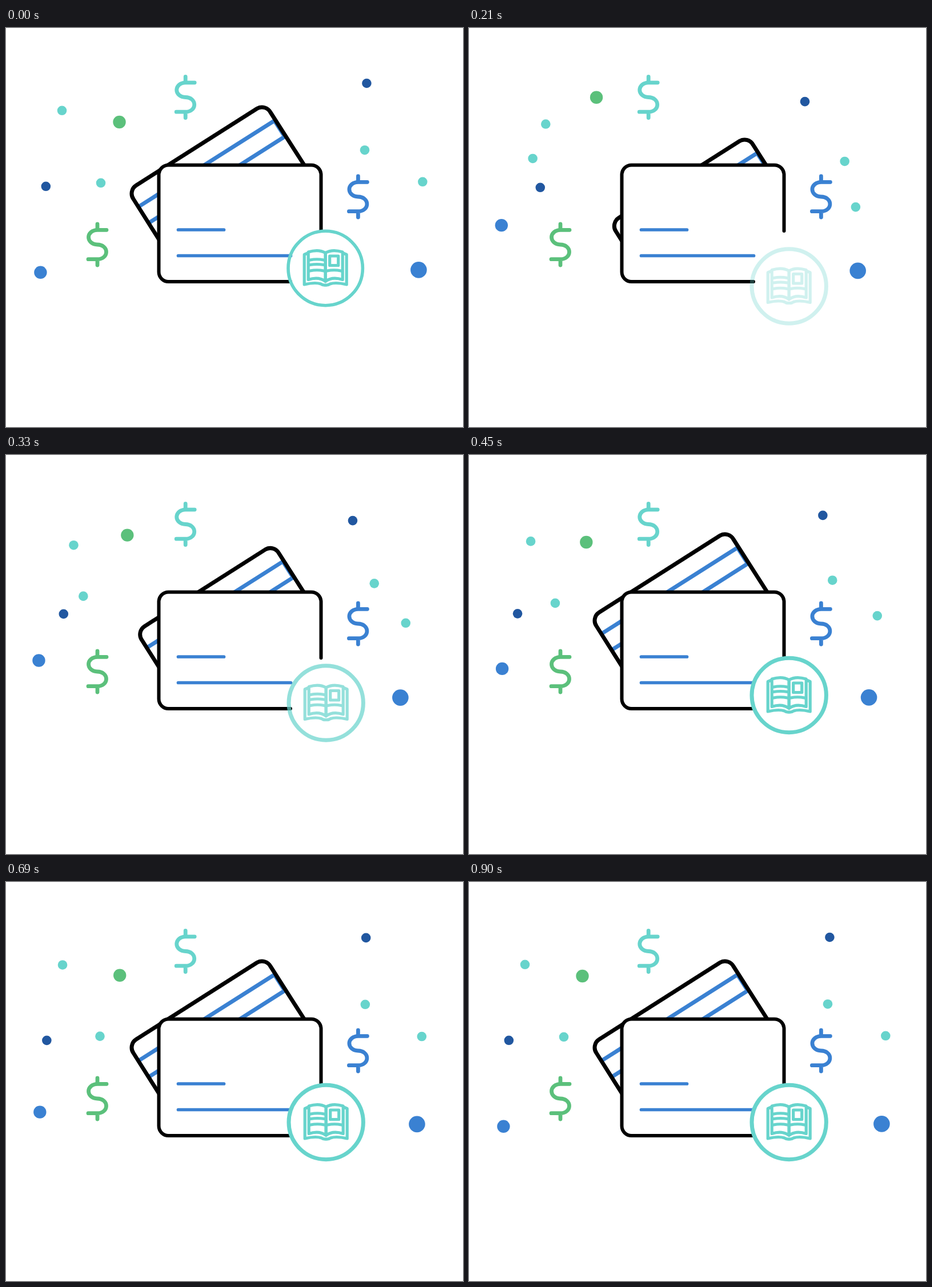
Recreate the animation shown at these times as an HTML page without scripts. Size 800 by 700 pixels, loop 0.93 s.

```html
<!DOCTYPE html>
<html lang="en">
<head>
<meta charset="utf-8">
<title>Cards and coins</title>
<style>
  @property --frame { syntax: "<integer>"; inherits: true; initial-value: 30; }
  @property --thin { syntax: "<integer>"; inherits: true; initial-value: 0; }

  html, body { margin: 0; width: 100%; height: 100%; overflow: hidden; background: #fff; }

  svg {
    display: block; width: 100%; height: 100%;
    --teal: #67d4cc; --green: #5bc07b; --blue: #3a81d2; --navy: #2157a0;
    animation: tick 930ms linear infinite;
  }

  /* A 30 ms clock: rest pose first, then 1 to 30 */
  @keyframes tick {
    0% { --frame: 30; --thin: 1; animation-timing-function: step-end; }
    3.225% { --frame: 1; --thin: 0; animation-timing-function: steps(30); }
    100% { --frame: 31; --thin: 0; }
  }

  .scene {
    --left: calc((30 - var(--frame)) / 27);
    --eased: calc(var(--left) * var(--left) * var(--left));
    --rise: max(0, 14 - var(--frame));
    fill: none; stroke-linecap: round; stroke-linejoin: round;
  }

  .teal { --ink: var(--teal); }
  .green { --ink: var(--green); }
  .blue { --ink: var(--blue); }
  .navy { --ink: var(--navy); }

  .dots circle {
    fill: var(--ink);
    translate: calc(var(--dx) * var(--eased) * 1px) calc(var(--dy) * var(--eased) * 1px);
  }
  .dots .steady {
    translate: calc((var(--dx) * var(--left) - 14 * max(0, var(--frame) - 29) * var(--snap, 0)) * 1px)
               calc(var(--dy) * var(--left) * 1px);
  }

  .dollars use { stroke: var(--ink); stroke-width: 6.8px; }
  .card { stroke: #000; }
  .stripe { stroke: var(--blue); }

  .back {
    stroke-width: 7px;
    translate: calc(var(--rise) * 4.9px) calc(var(--rise) * 8.14px);
  }
  .front { stroke-width: 6px; }

  .badge {
    stroke: var(--teal); stroke-width: 5.2px;
    opacity: calc((var(--frame) - 4) / 10);
    translate: calc(var(--thin) * -1px) calc(var(--rise) * 4.5px);
  }
  .ring { stroke-width: calc(7px - 1.4px * var(--thin)); }
</style>
</head>
<body>
<svg viewBox="0 0 800 700">
  <defs>
    <path id="dollar" d="M16-25.7H0C-9-25.7-15.5-20-15.5-12.9S-9 0 0 0 15.5 5.7 15.5 12.9 9 25.7 0 25.7H-16M0-36V-25.7M0 25.7V36"/>
    <path id="page" d="M-30-27-37-24V28.5Q-18 24-8 27.5-5 30 0 29.5M0-27Q-12-34-30-28.5V20Q-12 14 0 23V-27M-27 4.5Q-15 2-3 4.5"/>
    <clipPath id="outside"><path d="M0 0H800V241H268V700H0Z"/></clipPath>
  </defs>

  <g class="scene">
    <g clip-path="url(#outside)">
      <g class="back">
        <path class="stripe" d="M232 313.6 470 162.5 488 190.5 250 342"/>
        <path class="card" d="M286 400 223 300A17 17 0 0 1 228 276L440 141A17 17 0 0 1 463 148L560 300"/>
      </g>
    </g>

    <g class="front">
      <path class="card" fill="#fff" d="M551.5 356V257.5A17 17 0 0 0 534.5 240.5H284.5A17 17 0 0 0 267.5 257.5V428A17 17 0 0 0 284.5 445H498"/>
      <path class="stripe" stroke-width="5.7" d="M301.5 354H381.5M301.5 399.5H498.5"/>
    </g>

    <g class="dollars">
      <use class="teal" href="#dollar" x="314.2" y="121.5"/>
      <use class="green" href="#dollar" x="160" y="380"/>
      <use class="blue" href="#dollar" x="616.4" y="296"/>
    </g>

    <g class="dots">
      <circle class="green" cx="198.5" cy="165" r="11.2" style="--dx:39.7;--dy:-70"/>
      <circle class="teal" cx="98" cy="144.8" r="8.3" style="--dx:58.7;--dy:38.4"/>
      <circle class="teal" cx="166" cy="271.8" r="8.3" style="--dx:-88;--dy:-69.3"/>
      <circle class="navy" cx="69.8" cy="277.8" r="8.3" style="--dx:88.9;--dy:3.2"/>
      <circle class="navy" cx="631.4" cy="97" r="8.3" style="--dx:-70.2;--dy:52"/>
      <circle class="teal" cx="628" cy="214.2" r="8.3" style="--dx:48;--dy:32"/>
      <circle class="teal" cx="729.3" cy="269.8" r="8.3" style="--dx:-84.8;--dy:71.7"/>
      <circle class="blue steady" cx="60.4" cy="428.8" r="11.2" style="--dx:-4.2;--dy:-97"/>
      <circle class="blue steady" cx="736.4" cy="424.4" r="14.3" style="--dx:-65.4;--dy:1.7;--snap:1"/>
    </g>

    <g class="badge">
      <g transform="translate(560.2 421.5)">
        <circle class="ring" r="65.2"/>
        <use href="#page"/>
        <use href="#page" transform="scale(-1 1)"/>
        <path d="M-27-14.5Q-15-17-3-14.5M-27-6Q-15-8-3-6M7.5-21.5H22.5V-5H7.5Z"/>
      </g>
    </g>
  </g>
</svg>
</body>
</html>
```
